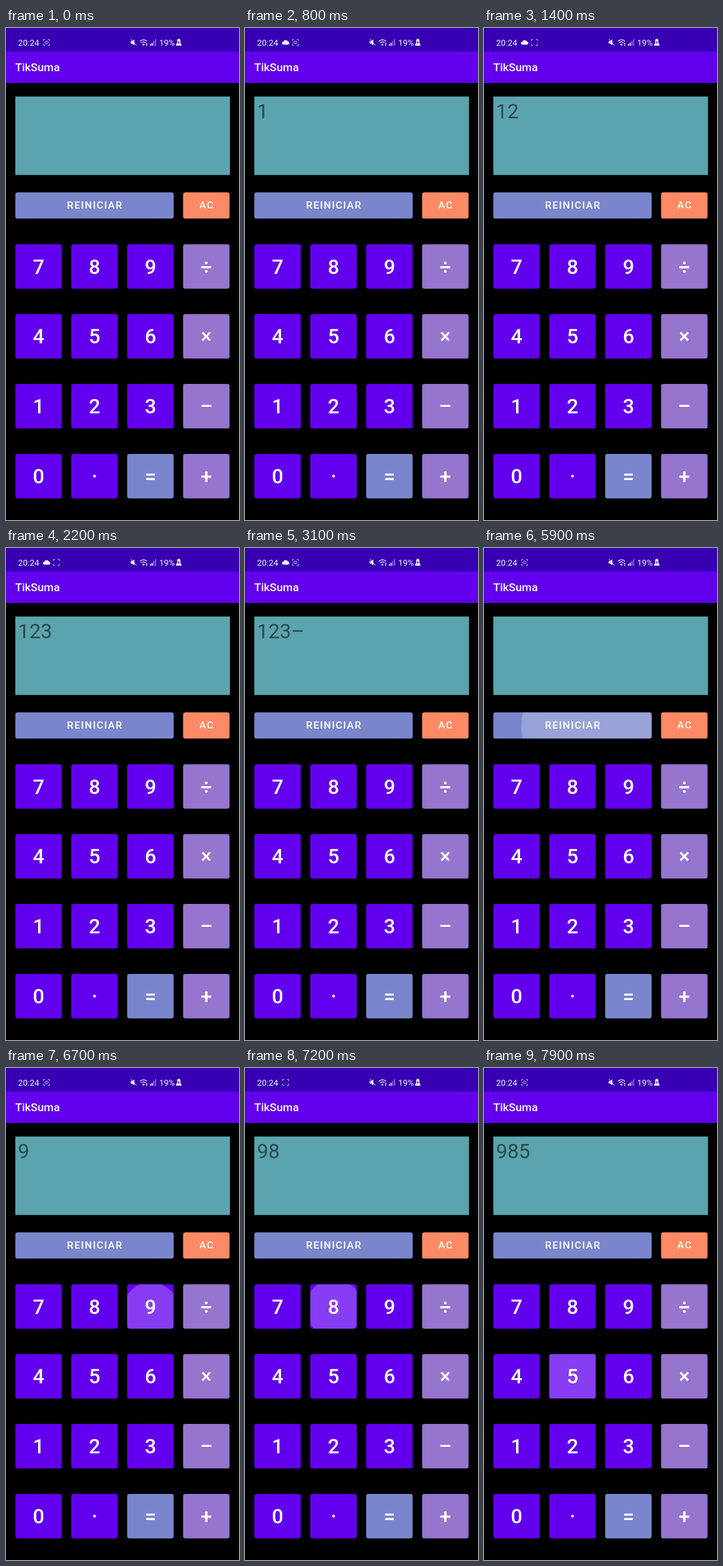
Write an HTML page that moves like this. It is 356x752 px and loops after 8000 ms.

```html
<!DOCTYPE html>
<html lang="es">
<head>
<meta charset="utf-8">
<title>TikSuma</title>
<style>
  html, body { margin: 0; width: 100%; height: 100%; overflow: hidden; background: #000; }
  #app { position: absolute; left: 0; top: 0; width: 356px; height: 752px; overflow: hidden;
    background: #000; color: #fff; font-family: Roboto, sans-serif; }
  #status { position: absolute; left: 0; top: 0; background: #3700b3; }
  #status text { font-size: 12.9px; fill: #f4f0fb; }
  #bar, #screen, .key { position: absolute; left: 0; top: 0; }
  #bar { transform: translateY(36px); width: 356px; height: 48.4px; box-sizing: border-box;
    padding-left: 13.9px; background: #6200ee; font: 500 17.3px/49px Roboto, sans-serif; }
  #screen { transform: translate(14.24px, 104.7px); width: 327.5px; height: 120.2px; background: #5ba4ad; }
  #screen span { position: absolute; left: 4px; top: 5px; font-size: 31px; line-height: 36px;
    color: rgba(0, 0, 0, .54); white-space: pre; }
  .key { overflow: hidden; border-radius: 3.4px; text-align: center; font-weight: 500; font-size: 31px; }
  .wide { font-size: 15.5px; letter-spacing: .0892em; text-indent: .0892em; }
  .ripple { position: absolute; border-radius: 50%; background: rgba(255, 255, 255, .24); opacity: 0; }
</style>
</head>
<body>
<div id="app">
  <svg id="status" width="356" height="36" fill="#f4f0fb">
    <text x="18.6" y="26.8">20:24</text>
    <path id="cloud" d="M58.6 25.4a2.2 2.2 0 0 1-.2-4.4 3.8 3.8 0 0 1 7-.5 2.5 2.5 0 0 1 .5 4.9z"/>
    <g id="rec" fill="none" stroke="#c9bcec">
      <path d="M-4.5-2.2V-4.5H-2.2M2.2-4.5H4.5V-2.2M4.5 2.2V4.5H2.2M-2.2 4.5H-4.5V2.2"/>
      <rect id="dot" x="-2.3" y="-1.8" width="4.6" height="3.6" rx="1"/>
    </g>
    <path d="M190.5 20.2h2.2l3.4-2.9v9.4l-3.4-2.9h-2.2z"/>
    <path d="M190.6 17l8.8 9.6" stroke="#f4f0fb"/>
    <g fill="none" stroke="#f4f0fb" stroke-width="1.2">
      <path d="M204.6 20.2q5.4-4.8 10.8 0M206.6 22.6q3.4-3 6.8 0"/>
    </g>
    <circle cx="210" cy="25.2" r="1.5"/>
    <path d="M213.4 24.4l1.5-2 1.5 2zM213.4 25.4l1.5 2 1.5-2z"/>
    <path d="M220 24.6h1.6v2.6H220zM222.6 22.4h1.6v4.8h-1.6z"/>
    <path d="M225.2 19.8h1.5v7.4h-1.5zM227.8 17h1.5v10.2h-1.5z" opacity=".5"/>
    <text x="234" y="26.8">19%</text>
    <path d="M262.7 16.6h2.6v1h1.2v6.2h1.4v3.2h-7.8v-3.2h1.4v-6.2h1.2z"/>
    <path d="M264.5 18.8l-2 3.6h1.4l-.5 2.8 2.2-3.7h-1.4z" fill="#3700b3"/>
  </svg>
  <div id="bar">TikSuma</div>
  <div id="screen"></div>
</div>
<script>
  const LOOP = 8000;
  const $ = id => document.getElementById(id);
  const app = $('app');
  const screenBox = $('screen');

  const play = (el, frames) => el.animate(
    frames.map(([time, props]) => ({ ...props, offset: Math.min(time / LOOP, 1) })),
    { duration: LOOP, iterations: Infinity });

  // Hard changes: each [time, props] holds until the next one.
  function switchAt(el, steps) {
    const held = steps.map(([time, props]) => [time, { ...props, easing: 'step-end' }]);
    play(el, [...held, [LOOP, steps[steps.length - 1][1]]]);
  }

  function show(el, ...spans) {
    const steps = spans[0][0] > 0 ? [[0, { opacity: 0 }]] : [];
    for (const [from, to] of spans) {
      steps.push([from, { opacity: 1 }]);
      if (to < LOOP) steps.push([to, { opacity: 0 }]);
    }
    switchAt(el, steps);
  }

  const keys = {};
  function addKey(label, x, y, w, h, color, wide) {
    const el = document.createElement('div');
    el.className = wide ? 'key wide' : 'key';
    el.textContent = label;
    el.style.cssText = `transform:translate(${x}px,${y}px);width:${w}px;height:${h}px;` +
      `line-height:calc(${h}px + .08em);background:${color}`;
    app.append(el);
    keys[label] = { el, w, h };
  }

  // Columns sit at 4, 28, 52 and 76 percent of the width; each is 20 percent wide.
  const colX = c => 356 * (0.04 + 0.24 * c);
  const KEY_W = 356 * 0.2;

  addKey('REINICIAR', colX(0), 251.3, colX(2) + KEY_W - colX(0), 40, '#7986cb', true);
  addKey('AC', colX(3), 251.3, KEY_W, 40, '#ff8a65', true);
  ['789÷', '456×', '123–', '0·=+'].forEach((row, r) => {
    [...row].forEach((label, c) => {
      const color = c === 3 ? '#9575cd' : label === '=' ? '#7986cb' : '#6200ee';
      addKey(label, colX(c), 330.5 + r * 106.8, KEY_W, 67.5, color);
    });
  });

  // The ripple grows from the touch point to the key's centre, then fades.
  function ripple({ el, w, h }, start, tx, ty) {
    const radius = Math.hypot(w, h) / 2;
    const scale = 0.3 * Math.max(w, h) / radius;
    const dot = document.createElement('div');
    dot.className = 'ripple';
    dot.style.cssText = `width:${2 * radius}px;height:${2 * radius}px;` +
      `left:${w / 2 - radius}px;top:${h / 2 - radius}px`;
    el.append(dot);
    const small = { transform: `translate(${tx}px,${ty}px) scale(${scale})` };
    const full = { transform: 'translate(0px,0px) scale(1)' };
    play(dot, [[0, small], [start, { ...small, easing: 'cubic-bezier(.4,0,.2,1)' }],
      [start + 225, full], [LOOP, full]]);
    play(dot, [[0, { opacity: 0 }], [start, { opacity: 0 }], [start + 75, { opacity: 1 }],
      [start + 225, { opacity: 1 }], [start + 375, { opacity: 0 }], [LOOP, { opacity: 0 }]]);
  }

  // time, key, text afterwards, touch offset from the key's centre
  const taps = [
    [430, '1', '1', 4, 8],
    [900, '2', '12', 2, 10],
    [1630, '3', '123', 0, 8],
    [2480, '–', '123–', -4, 6],
    [3430, '2', '123–2', 2, 10],
    [4330, '=', '121', 0, 8],
    [5817, 'REINICIAR', '', 51, 4],
    [6585, '9', '9', 0, 31],
    [7080, '8', '98', 2, 14],
    [7678, '5', '985', 2, 10]
  ];
  taps.forEach(([time, key, text, tx, ty], i) => {
    ripple(keys[key], time, tx, ty);
    if (!text) return;
    const span = document.createElement('span');
    span.textContent = text;
    screenBox.append(span);
    show(span, [time, i + 1 < taps.length ? taps[i + 1][0] : LOOP]);
  });

  // Status icons: the cloud notice pushes the recorder icon aside.
  const CLOUD_IN = 100, CLOUD_OUT = 5700;
  const near = { transform: 'translate(62px,22px)' };
  const far = { transform: 'translate(77px,22px)' };
  show($('cloud'), [CLOUD_IN, CLOUD_OUT]);
  switchAt($('rec'), [[0, near], [CLOUD_IN, far], [CLOUD_OUT, near]]);
  show($('dot'), [0, 1300], [2400, 4000], [5200, 6900], [7800, LOOP]);
</script>
</body>
</html>
```
